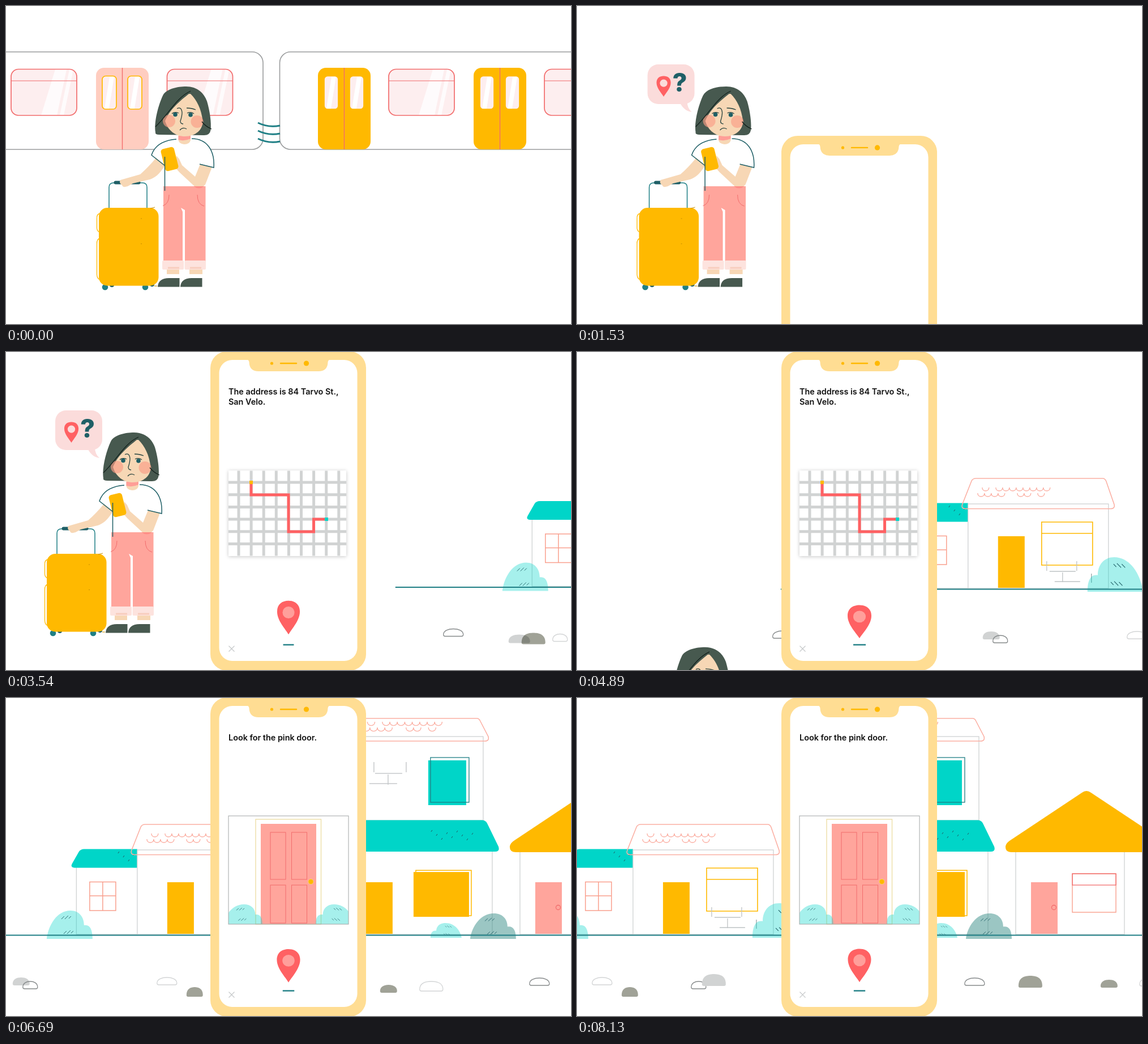
An HTML page that plays this animation: 998x561 px, repeating every 8160 ms.

```html
<!DOCTYPE html>
<html lang="en">
<head>
<meta charset="utf-8">
<title>Finding the door</title>
<style>
  html, body { margin: 0; width: 100%; height: 100%; overflow: hidden; background: #fff; }
  svg { display: block; width: 998px; height: 561px; }
  text { font-family: Inter, "Open Sans", sans-serif; }
</style>
</head>
<body>
<svg id="stage" viewBox="0 0 998 561" fill="none"></svg>
<script>
const LOOP = 8160;
const C = {
  sun: '#ffb900', cream: '#ffdd93', teal: '#00d5c8', sea: '#1f7f85', ink: '#1f5f66',
  hair: '#47594f', skin: '#f7d7b5', rose: '#ffa59c', red: '#ff6163', line: '#f26d6d',
  blush: '#fbdcdb', grey: '#d1d3d3', wall: '#cfd2d3', stone: '#a0a297'
};

// ---- drawing helpers
const path = (d, fill = 'none', stroke = 'none', w = 1.5, more = '') =>
  `<path d="${d}" fill="${fill}" stroke="${stroke}" stroke-width="${w}" ${more}/>`;
const box = (x, y, x2, y2, fill = 'none', stroke = 'none', w = 1.3, r = 0) =>
  `<rect x="${x}" y="${y}" width="${x2 - x}" height="${y2 - y}" rx="${r}" fill="${fill}" stroke="${stroke}" stroke-width="${w}"/>`;
const dot = (x, y, r, fill, more = '') => `<circle cx="${x}" cy="${y}" r="${r}" fill="${fill}" ${more}/>`;
const group = (id, body, more = '') => `<g id="${id}" ${more}>${body}</g>`;
const repeat = (n, f) => Array.from({ length: n }, (_, i) => f(i)).join('');

// map pin with its tip at the origin, 40 by 59
const pin = hole => path('M0 0C-5-9-20-24-20-40C-20-53-11-59 0-59S20-53 20-40C20-24 5-9 0 0Z', C.red) + dot(0, -38.5, 10.5, hole);

const hatch = (x, y) => path(`M${x} ${y + 6}l5-5m1 5l6-6m1 5l4-4`, 'none', C.ink, 0.9);

function bush(x, top, w, h, flip, color = C.teal, alpha = 0.35) {
  const at = flip ? `translate(${x + w} ${top}) scale(${-w / 81} ${h / 50})` : `translate(${x} ${top}) scale(${w / 81} ${h / 50})`;
  return `<g transform="${at}">` +
    path('M0 50C3 26 18 0 42 0C57 0 66 11 66 26C76 24 81 33 81 50Z', color, 'none', 0, `opacity="${alpha}"`) +
    hatch(26, 9) + hatch(30, 35) + '</g>';
}

// ---- train
function trainWindow(x) {
  return box(x, 111.5, x + 116, 193, '#fdeeef', 'none', 0, 13) +
    path(`M${x + 78} 112h20l-17 81h-28ZM${x + 103} 112h7l-17 81h-7Z`, '#fff', 'none', 0, 'opacity=".8"') +
    path(`M${x} 132h116`, 'none', C.line, 1.2) +
    box(x, 111.5, x + 116, 193, 'none', C.line, 1.7, 13);
}
function trainDoor(x, fill, rim) {
  const pane = px => box(px, 123.5, px + 25, 182, '#fdeeef', rim, 1.7, 6) +
    path(`M${px + 13} 125h8l-9 56h-8Z`, '#fff');
  return box(x, 109, x + 93, 253, fill, 'none', 0, 14) +
    path(`M${x + 46.5} 109v144`, 'none', C.line, 1.4) + pane(x + 11) + pane(x + 56);
}
const train =
  box(-700, 81, 454, 253, '#fff', '#9a9c9d', 1.6, 19) +
  box(483.5, 81, 1310, 253, '#fff', '#9a9c9d', 1.6, 19) +
  repeat(3, i => path(`M445 ${206 + i * 14}q18 9 39 5`, 'none', C.sea, 3)) +
  trainWindow(9) + trainDoor(159, '#ffcdc0', C.sun) + trainWindow(284.5) +
  trainDoor(551, C.sun, C.sun) + trainWindow(676) + trainDoor(826, C.sun, C.sun) +
  trainWindow(951) + trainDoor(1101, C.sun, C.sun);

// ---- traveller
const shoe = x => path(`M${x} 495.5Q${x + 1} 480 ${x + 20} 480H${x + 38.5}V495.5Z`, C.hair);
const suitcase =
  path('M182 356V320Q182 312 190 312H241Q249 312 249 320V356', 'none', C.sea, 1.5) +
  path('M166 366Q160 367 160.500 375V392Q161 398 166 399M166 410Q160 411 160.500 420V474Q161 482 167 483', 'none', C.sun, 1.3) +
  dot(187, 492, 4, C.ink) + dot(258, 491, 4, C.ink) +
  dot(175, 496, 5.3, C.sea) + dot(246, 496, 5.3, C.sea) +
  box(164, 356, 269.5, 493.5, C.sun, 'none', 0, 15) +
  path('M255 357l8-2M238 375h2M238 419.500h2M262 494h5', 'none', '#c98d00', 1) +
  path('M193.500 311.500H234.500', 'none', C.ink, 6, 'stroke-linecap="round"');

const woman =
  // legs
  box(284, 460, 306, 473, C.skin) + box(324, 460, 347, 473, C.skin) +
  shoe(268) + shoe(308) +
  path('M278 318H352.500V451H316V360L309 356L312 363V451H278Z', C.rose) +
  box(276, 449, 314, 465, '#fde3de', 'none', 0, 2) + box(315.5, 449, 353, 465, '#fde3de', 'none', 0, 2) +
  path('M286 462h20M325 462h20', 'none', '#f8cdbd', 3) +
  path('M277 352.500Q288 349 288 333M338 333Q338 350 350 353', 'none', C.line, 1) +
  // shirt
  path('M301 235C275 237 262 248 257 263L281 282V318H352V281L367 285C369 255 355 234 328 234Q315 252 301 235Z', '#fff') +
  path('M304.500 228H326V237Q324 244 315 244Q306 243 304.500 237Z', C.skin) +
  path('M304.500 229H326V234Q315 239 304.500 236Z', '#ff9e97') +
  // arms
  path('M265 268L281 281C271 297 263 303 254 306L224 313L215 318Q206 321 205 316Q199 312 202 307L237 297Q250 286 265 268Z', C.skin) +
  path('M301 264L306 270L311 281L334 301L343 279L364 284L352 315Q344 324 334 319L306 293L300 286Z', C.skin) +
  path('M331 318H350Q341 325 331 318Z', '#ff8d86') +
  `<g transform="rotate(-14 289 270)">${box(277, 250, 301, 290, C.sun, 'none', 0, 5)}</g>` +
  path('M301 235C275 237 262 248 257 263L281 282M328 234C355 234 369 255 367 285L342 279M280.500 266V326', 'none', C.ink, 1.5) +
  // head
  path('M264 223C261 205 269 175 277 158C283 146 303 142 318 142C338 142 350 154 355 168C360 185 363 205 361.500 219Q360 228 350 228L271 227Q263 227 264 223Z', C.hair) +
  path('M323 155C308 167 289 182 281 203C286 220 300 230 316 230C335 230 348 218 347.500 203C345 181 337 166 326 155Z', C.skin) +
  dot(288, 203, 11, '#fa9d86', 'opacity=".65"') + dot(337.5, 204, 11, '#fa9d86', 'opacity=".65"') +
  path('M326 150C300 162 286 193 264 213M346 204Q353 213 363 217', 'none', '#13211c', 1.3) +
  path('M293 190Q298 186 305 189M320 189Q326 186 332 190M319 180Q328 180 335 183M302 181Q310 177 311 188Q311 194 308 203Q308 208 313 208M307 219Q312 213 319 217', 'none', '#26433f', 1.3) +
  dot(299, 191.5, 3.8, C.ink) + dot(326, 192, 3.8, C.ink);

const bubble =
  box(179, 103, 262, 173, C.blush, 'none', 0, 19) + path('M236 170Q243 185 257 187Q249 180 249 168Z', C.blush) +
  `<g transform="translate(207.500 160) scale(.63 .62)">${pin(C.blush)}</g>` +
  `<text x="236" y="151" font-size="45" font-weight="800" text-anchor="middle" fill="${C.ink}">?</text>`;

// ---- street; x = 0 is the left wall of the second house
function scallops(x, y, s) {
  const row = (dx, dy, n) => path(`M${x + dx * s} ${y + dy}` + `c0 ${8 * s} ${12 * s} ${8 * s} ${12 * s} 0`.repeat(n), 'none', '#fbb0a4', 1.4);
  return row(25, 0, 1) + row(49, 0, 8) + row(17, 10, 4) + row(87, 10, 2) + row(123, 10, 1);
}
const specks = (x, y, n) => repeat(n, i => path(`M${x + i * 9 % 76} ${y + i * 7 % 17}l2-3`, 'none', C.ink, 1));
const bench = (x, y) => path(`M${x} ${y}v17M${x + 53} ${y}v17M${x + 5} ${y + 18}h46M${x + 28} ${y + 20}v17M${x + 14} ${y + 36}h45`, 'none', '#bfc3c5', 1.3);
const roofLine = (a, b, y, h) => path(
  `M${a + 25} ${y}H${b - 21}Q${b - 17} ${y} ${b - 15} ${y + 5}L${b - 1} ${y + h - 8}Q${b + 1} ${y + h} ${b - 7} ${y + h}H${a + 7}Q${a - 2} ${y + h} ${a + 1} ${y + h - 8}L${a + 17} ${y + 5}Q${a + 19} ${y} ${a + 25} ${y}Z`,
  'none', '#fbb0a4', 1.6);

const houses =
  // small cottage
  path('M-107.500 299V417H0', '#fff', C.wall, 1.3) +
  path('M-94 266.500H0V299.500H-111Q-119 299 -115 292L-103 271Q-100 266.500 -94 266.500Z', C.teal) + specks(-34, 274, 4) +
  path('M-84 324.500h46v50.500h-46ZM-61 324.500v50.500M-84 349h46', 'none', '#f9a08e', 1.5) +
  bush(-160, 375, 81, 50) +
  // long house
  box(0, 268, 248, 417, '#fff', C.wall) + roofLine(-11, 259, 223, 53.5) + scallops(0, 239, 1) +
  box(53, 325, 100, 416, C.sun) +
  path('M130 300H220V376H130ZM130 320H220', 'none', C.sun, 1.6) + bench(139, 369) +
  path('M218 391v16', 'none', '#8b9a9c', 1.2) + bush(211, 362, 98, 61, true) +
  // two storeys
  box(370, 68, 611, 216, '#fff', C.wall) + roofLine(360, 621, 36, 40) + scallops(379, 42, 1.1) +
  path('M418 113v18M475 113v18M420 133h48M443 135v18M410 151h49M387 135v18', 'none', '#c6c9cb', 1.5) +
  box(514, 110, 581, 189, C.teal) + box(518, 105, 586, 184, 'none', C.sea, 1.3) +
  box(354, 270, 627, 417, '#fff', C.wall) +
  path('M377 215.500H609Q615 215.500 618 221L638 262Q641 271 632 271H350Q341 271 344 262L364 222Q368 215.500 377 215.500Z', C.teal) + specks(519, 236, 9) +
  box(404, 325, 451, 416, C.sun) +
  box(488, 307, 586, 386, C.sun) + box(492, 304, 590, 384, 'none', C.sun, 1.5) +
  bush(518, 397, 55, 26, true) + bush(588, 380, 81, 45, false, '#2f8883', 0.48) +
  // gabled house
  box(676, 270, 868, 417, '#fff', C.wall) +
  path('M669 272Q658 272 658 263Q658 257 665 252L793 167Q801 161 809 167L937 252Q944 257 944 263Q944 272 933 272Z', C.sun) +
  box(703, 325, 750, 416, C.rose) + dot(743.5, 369.5, 4, 'none', `stroke="${C.line}" stroke-width="1.3"`) +
  box(776, 310, 853, 378, 'none', '#f9a08e', 1.4) + box(776, 310, 853, 330, 'none', C.line, 1.3);

// stones: x, y, width, height, look
const looks = { o: ['none', '#868a8b'], l: ['none', '#d3d5d6'], g: [C.grey, 'none'], d: [C.stone, 'none'] };
const stones = [
  [773, 492, 35, 13, 'o'], [888, 502, 38, 15, 'g'], [911, 499, 42, 20, 'd'], [966, 501, 26, 13, 'l'],
  [1144, 493, 30, 14, 'g'], [1162, 500, 26, 13, 'o'], [1399, 493, 35, 13, 'l'], [1451, 510, 29, 17, 'd'],
  [1574, 500, 26, 13, 'o'], [1593, 487, 42, 21, 'g'], [1793, 506, 30, 14, 'd'], [1863, 500, 41, 17, 'l'],
  [2057, 494, 35, 13, 'o'], [2152, 490, 42, 21, 'd'], [2297, 497, 30, 14, 'd'], [2366, 494, 35, 14, 'l']
].map(([x, y, w, h, k]) => path(
  `M${x + 3} ${y + h}q-3 0-3-3C${x} ${y + 3} ${x + w * .25} ${y} ${x + w / 2} ${y}S${x + w} ${y + 3} ${x + w} ${y + h - 3}q0 3-3 3Z`,
  ...looks[k], 1.3, k === 'd' ? 'style="mix-blend-mode:multiply"' : '')).join('');

// ---- phone
const shell =
  box(361, -1, 636, 562, C.cream, 'none', 0, 29) + box(376.5, 14, 620.5, 545, '#fff', 'none', 0, 23) +
  path('M426 13.500Q429 14 429.500 18Q430 34 446 34H552Q568 34 568.500 18Q569 14 572 13.500Z', C.cream) +
  dot(469.5, 20, 2.6, C.sun) + dot(530.5, 20, 4.6, C.sun) + path('M485 20H513', 'none', C.sun, 2.4, 'stroke-linecap="round"');
const say = (...lines) => lines.map((s, i) =>
  `<text x="393" y="${75 + i * 18}" font-size="14.4" font-weight="600" fill="#111">${s}</text>`).join('');
const map =
  `<g style="filter:drop-shadow(0 1px 3px rgba(0,0,0,.22))">${box(393, 209, 601, 360, '#fff')}</g>` +
  path(Array.from({ length: 9 }, (_, i) => `M${411 + 22.1 * i} 209.500V359.500`).join('') +
    Array.from({ length: 6 }, (_, i) => `M393 ${230 + 21.7 * i}H601`).join(''), 'none', C.grey, 5) +
  path('M433 230V252H499V317H543.500V295H566', 'none', C.red, 5, 'id="route" pathLength="1" stroke-dasharray="1 2"') +
  box(430, 227, 436, 233, C.sun) + box(563, 292, 569, 298, C.teal);
const panel = (x, y, y2) => box(x, y, x + 27, y2, 'none', C.line, 1);
const doorCard =
  box(441, 214, 556.5, 399, '#fff', '#ecdca0', 1.3) + box(450, 222, 548, 399, C.rose) +
  panel(467, 237, 320) + panel(504.5, 237, 320) + panel(467, 330, 397) + panel(504.5, 330, 397) +
  dot(538.5, 324, 4.6, C.sun, 'stroke="#f8d27a"') +
  `<g clip-path="url(#card)">${bush(385, 364, 68, 35)}${bush(547, 364, 68, 35, true)}</g>` +
  box(393, 208, 605, 399, 'none', '#a9adae', 1.1);

document.getElementById('stage').innerHTML =
  `<clipPath id="card">${box(393, 208, 605, 399, '#000')}</clipPath>` +
  group('train', train) +
  group('street', group('stones', stones) + group('houses', houses) + path('M0 418.500H4000', 'none', C.sea, 2, 'id="ground"')) +
  group('woman', group('bubble', bubble) + suitcase + woman) +
  group('phone', shell +
    group('first', say('The address is 84 Tarvo St.,', 'San Velo.')) + group('map', map) +
    group('second', say('Look for the pink door.') + doorCard) +
    group('dock', group('pin', pin('#ff9f9b')) + path('M-10 0H10', 'none', C.sea, 2.4, 'id="dash"') +
      path('M393.500 518.500l10 10m0-10l-10 10', 'none', '#c4c7c8', 1.1)));

// ---- motion
const part = {};
document.querySelectorAll('[id]').forEach(e => part[e.id] = e);
const span = (t, a, b) => Math.min(1, Math.max(0, (t - a) / (b - a)));
const cubic = p => p < .5 ? 4 * p ** 3 : 1 - 4 * (1 - p) ** 3;
const sine = p => (1 - Math.cos(Math.PI * p)) / 2;
const back = p => 1 + 2.7 * (p - 1) ** 3 + 1.7 * (p - 1) ** 2;

// smooth curve through [time, value] points
function curve(pts, t) {
  let i = 0;
  while (i < pts.length - 2 && t > pts[i + 1][0]) i++;
  const slope = k => {
    const a = pts[Math.max(0, k - 1)], b = pts[Math.min(pts.length - 1, k + 1)];
    return (b[1] - a[1]) / (b[0] - a[0]);
  };
  const [t0, v0] = pts[i], [t1, v1] = pts[i + 1], d = t1 - t0, p = span(t, t0, t1), q = 1 - p;
  return v0 * (1 + 2 * p) * q * q + v1 * p * p * (3 - 2 * p) + d * p * q * (slope(i) * q - slope(i + 1) * p);
}
const houseX = [[2350, 1350], [3540, 1037], [4890, 691], [5700, 433], [6690, 232], [8130, 99], [8160, 97]];
const stoneX = [[2350, 380], [3540, 0], [4890, -427], [5700, -796], [6690, -1132], [8130, -1372], [8160, -1376]];

const move = (e, x, y, extra = '') => e.setAttribute('transform', `translate(${x} ${y}) ${extra}`);
const fade = (e, a) => e.setAttribute('opacity', a);

function draw(t) {
  move(part.train, -1330 * span(t, 0, 700) ** 1.8, 0);

  const slide = cubic(span(t, 1025, 1975));
  move(part.woman, -92 * slide, 422 * sine(span(t, 3900, 5150)));
  move(part.phone, 0, 563 * (1 - slide));

  const pop = back(span(t, 990, 1290)) * (1 - cubic(span(t, 3680, 3950)));
  move(part.bubble, 257, 187, `scale(${Math.max(0, pop)}) translate(-257 -187)`);

  const x = curve(houseX, t);
  move(part.street, 0, -3.5 * (1 - sine(span(t, 3540, 4400))));
  move(part.houses, x, 0);
  move(part.stones, curve(stoneX, t), 0);
  move(part.ground, x - 349 + 29 * span(t, 3540, 5700), 0);

  const swap = span(t, 6150, 6400);
  fade(part.first, span(t, 1980, 2200) * (1 - swap));
  fade(part.map, span(t, 2150, 2400) * (1 - swap));
  fade(part.second, swap);
  part.route.setAttribute('stroke-dashoffset', 1 - sine(span(t, 2500, 3300)));

  const bob = Math.cos(2 * Math.PI * (t - 4890) / 1005);
  fade(part.dock, span(t, 1950, 2150));
  move(part.pin, 499, 500.6 + 4.4 * bob, `scale(${1.02 + .03 * bob} ${1 - .01 * bob})`);
  move(part.dash, 499, 516.5, `scale(${1 + .1 * bob} 1)`);
}

const start = performance.now();
function tick() {
  draw((performance.now() - start) % LOOP);
  requestAnimationFrame(tick);
}
draw(0);
requestAnimationFrame(tick);
</script>
</body>
</html>
```
